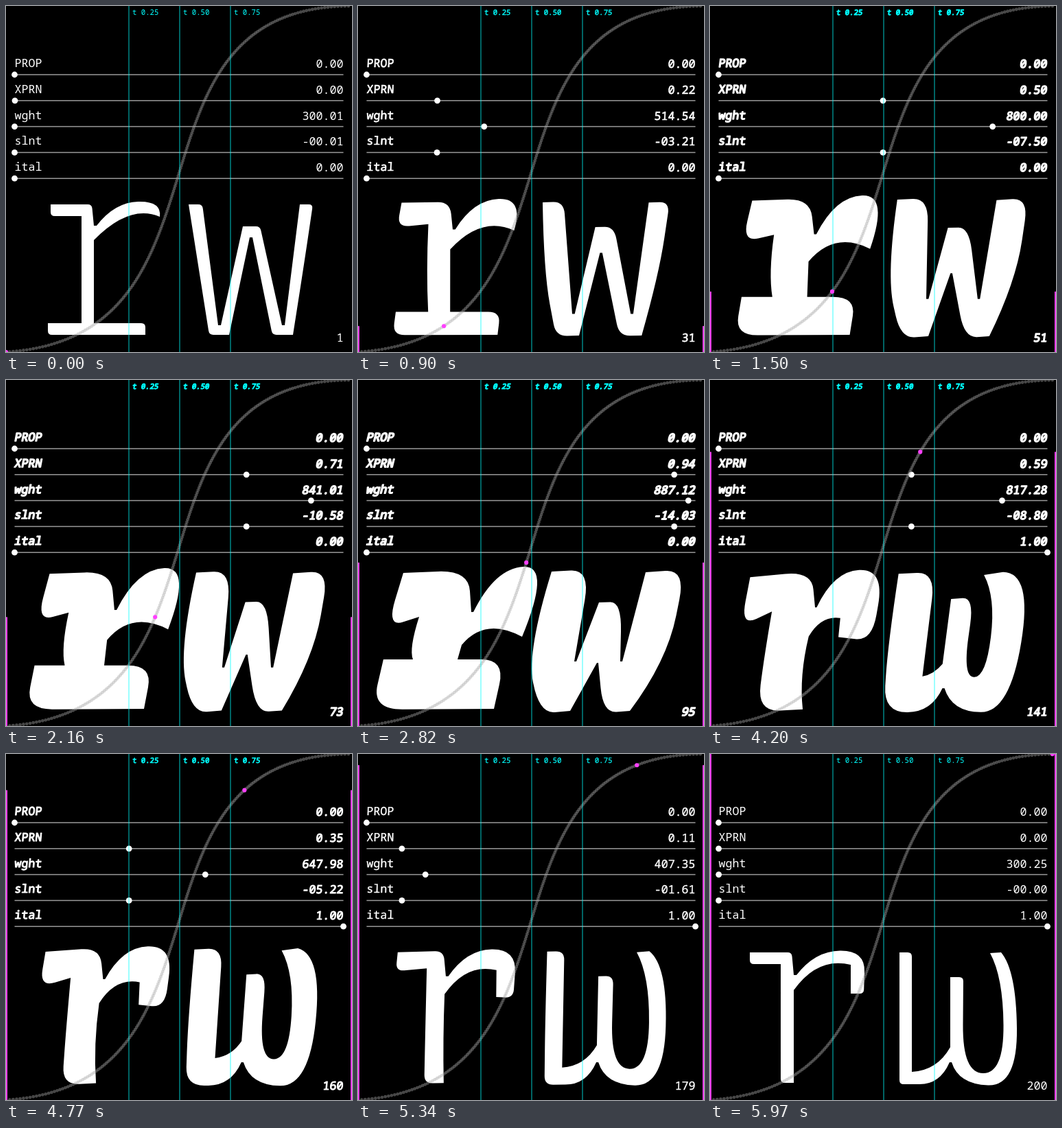
An HTML page with a canvas for the animation above (6 s loop, 504 px wide and 504 px high).

```html
<!DOCTYPE html>
<html lang="en">
<head>
<meta charset="utf-8">
<title>Variable type axes</title>
<style>
html, body { margin: 0; width: 100%; height: 100%; overflow: hidden; background: #000; }
canvas { display: block; }
</style>
</head>
<body>
<canvas id="stage" width="504" height="504"></canvas>
<script>
const ctx = document.getElementById('stage').getContext('2d');
const SIZE = 504, STEPS = 200, STEP_MS = 30;
const LEFT = 12.5, RIGHT = 491.5;
const CYAN = '#00ffff', MAGENTA = '#ff40ff';
const lerp = (a, b, k) => a + (b - a) * k;

// A letter is a ring of key points: s sharp, r rounded corner, c control of a curve.
// Each point is given as light x,y and heavy x,y.
const letter = text => text.trim().split(/\s+/).map(p => [p[0], ...p.slice(1).split(',').map(Number)]);

// heavy: [weight, slant] of the heavy drawing, as fractions of the axes
const roman = {
  heavy: [.9785, .9356],
  letters: [
    `s65,289,66,281 r125,289,161,277 s128,320,165,338 s132,320,168,338 c158,286,200,274
     c227,284,282,270 s224,307,239,374 c180,288,185,345 s128,341,151,386 s128,462,145,407
     r203,462,214,407 s203,479,198,479 r61,479,20,480 s61,462,37,407 s110,462,80,407
     c110,384,74,392 s110,306,89,345 r65,306,42,360`,
    `s266,289,282,279 r286,289,338,276 s309,465,315,410 s313,465,318,410 s345,321,351,324
     r370,321,384,323 s402,465,382,410 s406,465,385,410 s428,289,419,280 r447,289,477,276
     c433,384,450,410 s418,479,396,482 r388,479,357,485 s359,337,350,412 s355,337,348,412
     s325,479,309,482 r296,479,264,486 c281,384,246,395`
  ].map(letter)
};
const italic = {
  heavy: [.928, .784],
  letters: [
    `s58,289,61,287 r119,289,156,277 s122,322,160,333 s126,322,162,333 c153,287,188,277
     c226,286,262,273 r224,349,238,386 s205,349,184,379 s205,307,188,354 c157,295,164,351
     s122,344,148,379 c122,410,130,435 s122,479,135,480 r103,479,60,484 c103,392,74,405
     s103,306,89,343 r58,306,43,368`,
    `s276,289,277,281 r294,289,337,278 s294,463,311,426 c331,461,324,423 s350,427,336,411
     s350,325,353,318 r369,325,389,315 c368,465,367,428 c428,465,396,426 c427,325,416,315
     s408,290,400,283 s424,289,430,278 c446,315,477,274 c448,484,432,484 c362,481,348,484
     s352,449,338,449 s349,449,335,449 c335,481,318,484 r276,481,246,485 c276,385,256,385`
  ].map(letter)
};

const bezier = (t, a, b) => 3 * t * (1 - t) ** 2 * a + 3 * t * t * (1 - t) * b + t ** 3;
const curveX = t => bezier(t, .7, .3);
const curveY = t => bezier(t, 22 / 504, 1);
const slope = slant => Math.tan(slant * Math.PI / 12);

// Value between five keys spaced evenly in time, paced by the curve's height.
function keyed(t, keys) {
  const i = Math.floor(t * 4), from = curveY(i / 4), to = curveY((i + 1) / 4);
  return lerp(keys[i], keys[i + 1], (curveY(t) - from) / (to - from));
}

function dot(x, y, r, color) {
  ctx.fillStyle = color;
  ctx.beginPath();
  ctx.arc(x, y, r, 0, 7);
  ctx.fill();
}

// Where the rounding of point p begins on its edge towards q.
function cut(p, q, radius) {
  const length = Math.hypot(q.x - p.x, q.y - p.y);
  const k = p.kind === 's' ? 0
    : p.kind === 'r' ? Math.min(.5, radius / length)
    : q.kind === 's' ? 1 : .5;
  return [lerp(p.x, q.x, k), lerp(p.y, q.y, k)];
}

function drawLetters({ heavy, letters }, weight, slant) {
  const k = (weight + slant) / (heavy[0] + heavy[1]);
  const skew = k * slope(heavy[1]) - slope(slant);
  const radius = lerp(6, 45, k);
  ctx.fillStyle = '#fff';
  for (const points of letters) {
    const ring = points.map(([kind, x, y, heavyX, heavyY]) => {
      const py = lerp(y, heavyY, k);
      return { kind, x: lerp(x, heavyX, k) + (py - 384) * skew, y: py };
    });
    ctx.beginPath();
    ring.forEach((p, i) => {
      const next = ring[(i + 1) % ring.length], prev = ring.at(i - 1);
      ctx.lineTo(...cut(p, prev, radius));
      ctx.quadraticCurveTo(p.x, p.y, ...cut(p, next, radius));
    });
    ctx.fill();
  }
}

function write(text, x, y, size, color, align, weight, slant) {
  ctx.save();
  ctx.translate(x, y);
  ctx.transform(1, 0, -slope(slant), 1, -slope(slant) * size * .3, 0);
  ctx.font = `400 ${size}px "Noto Sans Mono", "DejaVu Sans Mono", monospace`;
  ctx.textAlign = align;
  ctx.fillStyle = ctx.strokeStyle = color;
  ctx.lineJoin = 'round';
  ctx.lineWidth = .01 + weight * size * .115;
  ctx.fillText(text, 0, 0);
  ctx.strokeText(text, 0, 0);
  ctx.restore();
}

function draw(step) {
  const t = step / STEPS;
  const ital = t < .5 ? 0 : 1;
  const xprn = keyed(t, [.001, .5, 1, .5, 0]);
  const wght = keyed(t, [300.01, 800, 900, 800, 300.01]);
  const slnt = keyed(t, [-.01, 7.5, 15, 7.5, 0]);
  const weight = (wght - 300) / 600, slant = Math.max(0, slnt / 15);
  const label = (text, x, y, size, color, align) =>
    write(text, x, y, size, color, align, weight, slant);

  ctx.fillStyle = '#000';
  ctx.fillRect(0, 0, SIZE, SIZE);
  drawLetters(ital ? italic : roman, weight, slant);

  const axes = [
    ['PROP', '0.00', 0],
    ['XPRN', xprn.toFixed(2), xprn],
    ['wght', wght.toFixed(2), weight],
    ['slnt', '-' + Math.abs(slnt).toFixed(2).padStart(5, '0'), slant],
    ['ital', ital.toFixed(2), ital]
  ];
  axes.forEach(([name, value, pos], i) => {
    const y = 100 + 37.8 * i;
    ctx.fillStyle = '#999';
    ctx.fillRect(LEFT, y - .75, RIGHT - LEFT, 1.5);
    dot(lerp(LEFT, RIGHT, pos), y, 4.4, '#fff');
    label(name, LEFT, y - 11, 16.67, '#fff', 'left');
    label(value, RIGHT, y - 10, 16.67, '#fff', 'right');
  });
  label(step + 1, RIGHT, 489, 16.67, '#fff', 'right');

  for (let i = 0; i < STEPS; i++) {
    const u = i / STEPS;
    dot(curveX(u) * SIZE, SIZE - curveY(u) * SIZE, 2.4, 'rgba(165,165,165,.43)');
  }

  [.25, .5, .75].forEach((u, i) => {
    const x = 179 + 74 * i;
    ctx.fillStyle = 'rgba(0,255,255,.52)';
    ctx.fillRect(x - .75, 0, 1.5, SIZE);
    label('t ' + u.toFixed(2), x + 5, 13, 10.67, CYAN, 'left');
  });

  const y = SIZE - curveY(t) * SIZE;
  ctx.fillStyle = MAGENTA;
  ctx.fillRect(0, y, 2, SIZE - y);
  ctx.fillRect(SIZE - 2, y, 2, SIZE - y);
  dot(curveX(t) * SIZE, y, 3.1, MAGENTA);
}

const start = performance.now();
function frame() {
  draw(Math.floor((performance.now() - start) / STEP_MS) % STEPS);
  requestAnimationFrame(frame);
}
frame();
</script>
</body>
</html>
```
